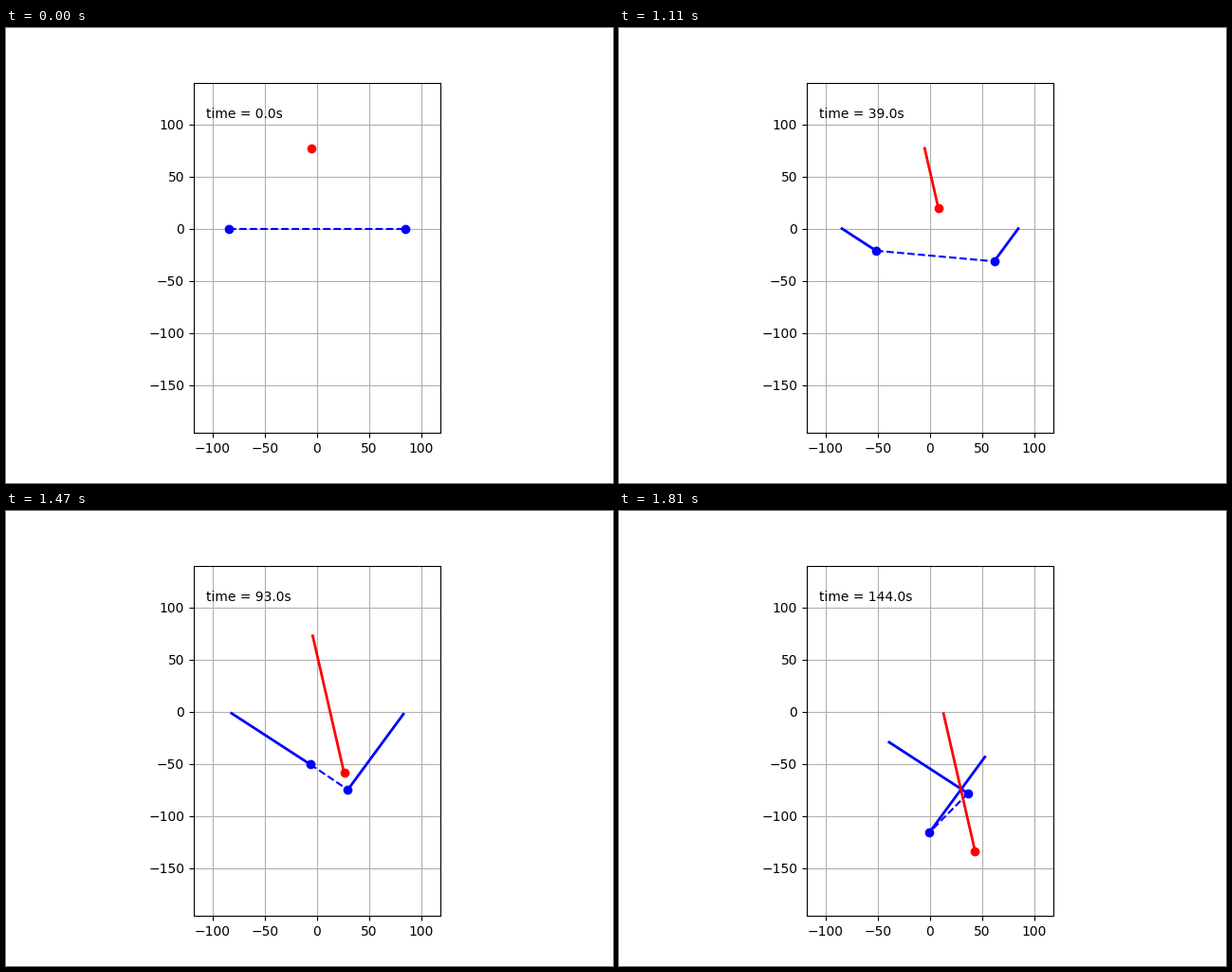
These frames come from a looping animation (640x480 px, 3.86 s). A matplotlib script:

```python
import numpy as np
import matplotlib.pyplot as plt
from matplotlib.animation import FuncAnimation

TICK_MS = 10
LOOP_MS = 3860
HOLD_MS = 870          # still time before the first move
STEP_MS = 20
STEP_SECONDS = 3.0     # simulated time per step
LAST_STEP = 48
TRAIL_STEPS = 30

# start position, heading in degrees, speed in units per second
BODIES = [
    ((-84.5, 0.0), -33.0, 1.0, "blue"),
    ((84.5, 0.0), -126.3, 1.0, "blue"),
    ((-5.2, 77.0), -77.1, 1.5, "red"),
]


def make_path(start, heading, speed):
    angle = np.radians(heading)
    times = np.arange(LAST_STEP + 1) * STEP_SECONDS
    direction = np.array([np.cos(angle), np.sin(angle)])
    return np.array(start) + speed * times[:, None] * direction


fig = plt.figure(figsize=(6.4, 4.8), dpi=100)
ax = fig.add_subplot(aspect="equal", xlim=(-118.3, 118.3), ylim=(-196, 140))
ax.grid()

paths = [make_path(start, heading, speed) for start, heading, speed, _ in BODIES]
colors = [body[3] for body in BODIES]
link, = ax.plot([], [], "--", color="blue", lw=1.5)
trails = [ax.plot([], [], "-", color=c, lw=2)[0] for c in colors]
dots = [ax.plot([], [], "o", color=c)[0] for c in colors]
clock = ax.text(0.05, 0.9, "", transform=ax.transAxes)


def step_at(ms):
    if ms < HOLD_MS:
        return 0
    return min((ms - HOLD_MS) // STEP_MS + 1, LAST_STEP)


def update(frame):
    step = step_at(frame * TICK_MS)
    first = max(0, step - TRAIL_STEPS)
    for path, trail, dot in zip(paths, trails, dots):
        trail.set_data(*path[first:step + 1].T)
        dot.set_data(*path[step:step + 1].T)
    link.set_data(*np.array([paths[0][step], paths[1][step]]).T)
    clock.set_text(f"time = {step * STEP_SECONDS:.1f}s")
    return [link, *trails, *dots, clock]


anim = FuncAnimation(fig, update, frames=LOOP_MS // TICK_MS,
                     interval=TICK_MS, repeat=True, repeat_delay=0)
plt.show()
```
